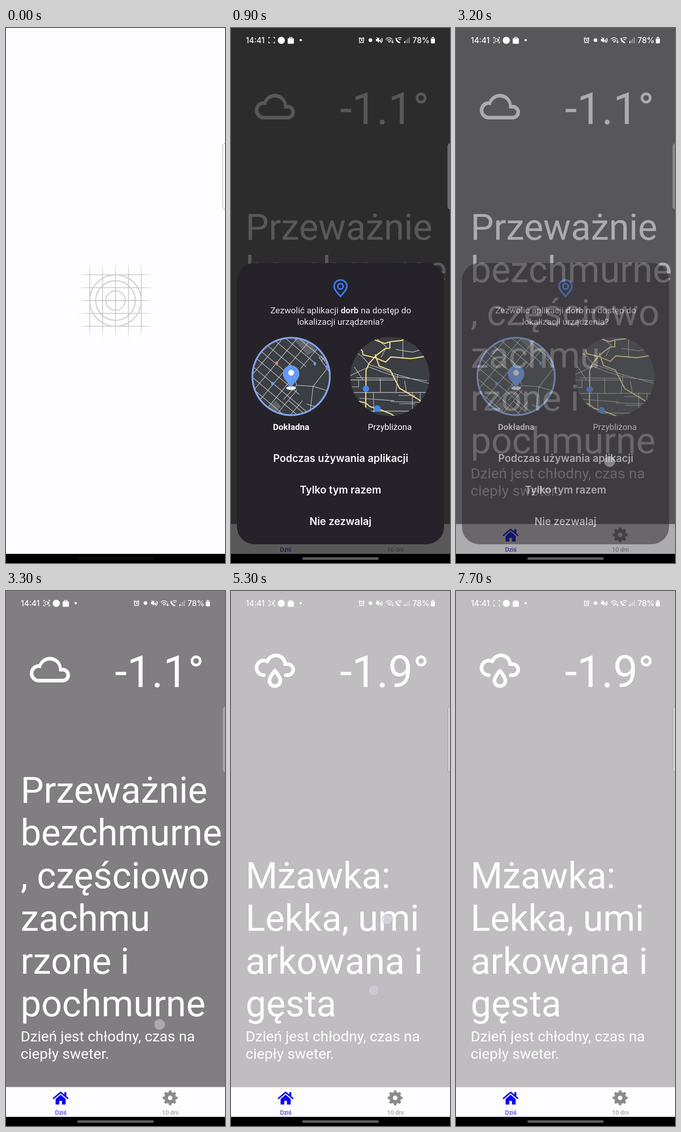
Recreate the animation shown at these times as an HTML page. Size 479 by 1170 pixels, loop 8 s.

```html
<!DOCTYPE html>
<html lang="pl">
<head>
<meta charset="utf-8">
<style>
html, body { margin: 0; width: 100%; height: 100%; overflow: hidden; background: #000; }
svg { display: block; width: 100%; height: 100%; }
text { font-family: Roboto, sans-serif; fill: #fdfcff; white-space: pre; }
.mid { text-anchor: middle; }
.big { font-size: 96px; }
.head { font-size: 80px; }
.note { font-size: 32px; }
.tab { font-size: 13.3px; }
.ask { font-size: 19.05px; fill: #e6e5e8; }
.label { font-size: 18.7px; }
.btn { font: 600 22.35px Inter, sans-serif; }
.clock { font: 500 17px Inter, sans-serif; }
.line { fill: none; stroke-linejoin: round; }
.road path, .road line { fill: none; stroke: #d4d5d7; stroke-width: 1.1; vector-effect: non-scaling-stroke; }
.road .main { stroke: #f8df90; stroke-width: 2.4; stroke-linejoin: round; }
</style>
</head>
<body>
<svg viewBox="0 0 479 1170" preserveAspectRatio="none">
  <defs>
    <linearGradient id="fadeX" gradientUnits="userSpaceOnUse" x1="155" x2="324" y1="0" y2="0">
      <stop stop-color="#b8b7ba" stop-opacity="0"/><stop offset=".17" stop-color="#b8b7ba"/>
      <stop offset=".83" stop-color="#b8b7ba"/><stop offset="1" stop-color="#b8b7ba" stop-opacity="0"/>
    </linearGradient>
    <linearGradient id="fadeY" href="#fadeX" x1="0" x2="0" y1="511.5" y2="680.5"/>
    <clipPath id="disc"><circle r="86.5"/></clipPath>
  </defs>

  <rect width="479" height="1170"/>
  <rect id="page" width="479" height="1150"/>
  <text id="loading" class="big" x="0" y="102">Loading...</text>
  <g id="cloudy"></g>
  <g id="rainy"></g>
  <g>
    <rect y="1085" width="479" height="65" fill="#fdfcff"/>
    <rect y="1084.5" width="479" height="1" fill="#d8d7da"/>
    <g id="tabs">
      <g fill="#0803f0">
        <path class="line" d="M104 1109.5 119.5 1096.5 135 1109.5" stroke="#0803f0" stroke-width="3.2" stroke-linecap="round"/>
        <path d="M127.5 1096h4.5v9h-4.5zM108.5 1111 119.5 1101.5 130.5 1111V1123H122.5V1115H116.5V1123H108.5Z"/>
      </g>
      <g class="line" stroke="#8a898c">
        <circle cx="359" cy="1108.5" r="9" stroke-width="8"/>
        <circle cx="359" cy="1108.5" r="13.6" stroke-width="5.4" pathLength="16" stroke-dasharray="1" stroke-dashoffset=".5"/>
      </g>
      <text class="tab mid" x="120" y="1145" style="fill:#1610c8">Dziś</text>
      <text class="tab mid" x="359.5" y="1145" style="fill:#8a898c">10 dni</text>
    </g>
  </g>

  <g id="splash">
    <rect width="479" height="1150" fill="#fdfcff"/>
    <g id="guides" class="line" stroke-width="1.3"></g>
    <g class="line" stroke="#cfced1" stroke-width="2.4">
      <circle cx="239.5" cy="596" r="56.3"/><circle cx="239.5" cy="596" r="43.3"/><circle cx="239.5" cy="596" r="21.2"/>
    </g>
  </g>

  <rect id="dim" width="479" height="1150"/>
  <rect x="474" y="252.5" width="20" height="144" rx="6" fill="#fff" fill-opacity=".3" stroke="#808082" stroke-opacity=".75"/>

  <g id="status" fill="#fdfcff" stroke="#fdfcff" stroke-width="0">
    <text class="clock" x="32.5" y="32.5">14:41</text>
    <path class="line" stroke-width="1.3" d="M82.5 23.500v-3h3M92.500 20.500h3v3M95.500 29.500v3h-3M85.500 32.500h-3v-3"/>
    <path id="rec" class="line" stroke-width="1.2" d="M85.500 23.500h5.500v6h-5.500zM91 26l2.500-2v5l-2.500-2"/>
    <circle cx="110" cy="27" r="7.8"/>
    <rect x="124" y="22.500" width="13.500" height="12" rx="1.500"/>
    <path class="line" stroke-width="1.4" d="M128 23v-2.500h5.500v2.500"/>
    <circle cx="152.500" cy="26.500" r="2.500"/>
    <g class="line" stroke-width="1.7">
      <circle cx="285.500" cy="27" r="4.700"/>
      <path d="M285.500 24v3.300h2.500M279.500 23.500l3-3M291.500 23.500l-3-3M282 31.500l-1.500 1.500M289 31.500l1.500 1.500"/>
      <path d="M318.500 20.500l11 12M327 24.500q1.500 2 0 4.500M329.500 22q3 4.500 0 8.500"/>
      <path d="M338.500 24.500q7-6.500 14 0M341 27.500q4.500-4 9 0M349.500 31v-5M353.500 26v6.500M351.500 30.500l2 2 2-2" stroke-width="1.400"/>
      <path d="M361 22q1 8.500 9 10" stroke-width="3"/>
      <path d="M364.500 22.500q4.500-3.500 9 0M366.500 25.500q2.500-2 5 0" stroke-width="1.400"/>
    </g>
    <circle cx="305" cy="26.500" r="4"/>
    <path d="M317 24h3l4-3.500v12l-4-3.500h-3zM344 30a1.700 1.700 0 1 0 3.400 0a1.700 1.700 0 1 0-3.400 0"/>
    <path d="M379 29h2v4h-2z"/>
    <path d="M382 26.500h2v6.500h-2zM385.500 23.500h2v9.500h-2zM389 20.500h2v12.500h-2z" opacity=".45"/>
    <text class="clock" x="397" y="32.500">78%</text>
    <rect x="437" y="21" width="9" height="12.500" rx="2" opacity=".55"/>
    <path d="M439.500 19.500h4v2h-4zM437 24h9v7.500q0 2-2 2h-5q-2 0-2-2z"/>
  </g>

  <g id="sheet">
    <rect x="13" y="514" width="453" height="615" rx="38" fill="#252329"/>
    <path class="line" stroke="#3a77f4" stroke-width="3.500" d="M239.500 587C235 581 225.500 573 225.500 565A14 14 0 0 1 253.500 565C253.500 573 244 581 239.500 587Z"/>
    <circle class="line" cx="239.500" cy="565" r="6" stroke="#3a77f4" stroke-width="3.300"/>
    <text class="ask mid" x="240" y="624">Zezwolić aplikacji <tspan font-weight="700">dorb</tspan> na dostęp do</text>
    <text class="ask mid" x="239.500" y="649">lokalizacji urządzenia?</text>

    <g transform="translate(131.500 762)">
      <g clip-path="url(#disc)">
        <rect x="-87" y="-87" width="174" height="174" fill="#3a3d41"/>
        <g id="near" class="road">
          <path d="M-10-95 12-85 46-48 30-38-8-82ZM-55 70-28 44-18 54-45 84Z" style="fill:#606367;stroke:none"/>
          <g id="streets" transform="rotate(40)"></g>
          <path d="M6-10 60-30 100 0V80L36 100 28 60 8 18Z" style="fill:#3a3d41;stroke:none"/>
          <path d="M2-12 10 16 40 18 66 26 100 36M10 16-14 42M40 18 34 68 26 100M66 26 48 74M28 50 78 66M-4 44 40 82M40 18 70-20M50-36 76 1H100M54-38 78-3H100"/>
        </g>
        <g id="pins"></g>
      </g>
      <g id="exact">
        <circle class="line" r="84.700" stroke="#86a4ee" stroke-width="3.800"/>
        <ellipse cy="25.500" rx="10.500" ry="4" fill="#fff" stroke="#a9c2f7"/>
        <path d="M0 26C-3 15-18 8-18-6A18 18 0 0 1 18-6C18 8 3 15 0 26Z" fill="#659af5"/>
        <circle cy="-8" r="6.200" fill="#fff"/>
      </g>
    </g>

    <g transform="translate(347.500 762)">
      <g clip-path="url(#disc)">
        <rect x="-87" y="-87" width="174" height="174" fill="#3a3d41"/>
        <g id="far" class="road">
          <path d="M0-120 50-90 110-100V-130H0Z" style="fill:#56595d;stroke:none"/>
          <path d="M-50 110q15-8 30-2 12-8 35-2v14h-65z" style="fill:#222326;stroke:none"/>
          <path d="M-100-70-64-46-47-27-17-17 13-5 85 15 125 18M-125 15-85-5-48-22-17-10 18 1 86 10M-77 3-7 4 15 4M-125 8H12M-72 8V24H-110M-125 37H125M30-120V-40M14-62 52-56 73-62 120-64M18-5 14 36M20 44H58M22 63H58M52 36V90M2 58 83 60M-38 36-36 110M-22 4V36M-82-22-62 8M-70 50 10 56M-90 60V120M70 36V110M50-90 90-78 110-30M-20-44-8-68-40-95M34 10 38 36M-60 80H70"/>
          <path class="main" d="M-120-95-82-80-63-58-62-50-34-43-10-33 2-45 48-41 74-45 125-54M-70-105-32-83-12-76 1-80 28-83 60-112M0-80V-65L-11-64-32-48-48-30-55-14-56 120M-34-51-25-24 1-14 22 27 66 53 125 104M-125 40-78 56-56 61-45 70-29 74 2 86 30 105 80 112M-125-36-96 6-88 34-112 60M75-110 105-75 108-45"/>
        </g>
        <g id="shields" fill="#4484ee"><circle r="7"/><circle r="7"/></g>
      </g>
      <g id="rough">
        <circle r="50" fill="#7e9fe4" fill-opacity=".55" stroke="#8eabe8" stroke-width="1.300"/>
        <circle class="line" r="85.500" stroke="#6d9bf2" stroke-width="2.400"/>
      </g>
    </g>

    <text class="label mid" x="131.500" y="879" font-weight="700">Dokładna</text>
    <text class="label mid" x="347.300" y="879">Przybliżona</text>
    <text class="btn mid" x="240" y="948.500">Podczas używania aplikacji</text>
    <text class="btn mid" x="239.500" y="1017.500">Tylko tym razem</text>
    <text class="btn mid" x="239.500" y="1086.500">Nie zezwalaj</text>
  </g>

  <rect id="pill" x="156" y="1157.500" width="167" height="5.500" rx="2.700" fill="#fff"/>
  <g id="taps" fill="#e0e0e4" fill-opacity=".6" stroke="#8fa6cf" stroke-opacity=".7"></g>
</svg>

<script>
const $ = id => document.getElementById(id);
const clamp = x => Math.min(1, Math.max(0, x));
const ramp = (t, from, to) => clamp((t - from) / (to - from));
const easeOut = p => 1 - (1 - p) ** 3;
const show = (id, alpha) => $(id).setAttribute('opacity', alpha);
const move = (el, value) => el.setAttribute('transform', value);

const CLOUD = 'M6,19A5,5 0 0,1 1,14A5,5 0 0,1 6,9C7,6.65 9.3,5 12,5C15.43,5 18.24,7.66 18.5,11.03L19,11A4,4 0 0,1 23,15A4,4 0 0,1 19,19H6M19,13H17V12A5,5 0 0,0 12,7C9.5,7 7.45,8.82 7.06,11.19C6.73,11.07 6.37,11 6,11A3,3 0 0,0 3,14A3,3 0 0,0 6,17H19A2,2 0 0,0 21,15A2,2 0 0,0 19,13Z';

// Weather screen: icon, temperature, bottom-aligned heading and note
function weather(id, icon, temp, lines) {
  const heading = lines.map((s, i) =>
    `<text class="head" x="32" y="${930 - 93.4 * (lines.length - 1 - i)}">${s}</text>`).join('');
  $(id).innerHTML = `<g transform="translate(48 124) scale(4)">${icon}</g>
    <text class="big" x="238" y="210">${temp}°</text>${heading}
    <text class="note" x="32" y="985">Dzień jest chłodny, czas na</text>
    <text class="note" x="32" y="1022.5">ciepły sweter.</text>`;
}
weather('cloudy', `<path fill="#fdfcff" d="${CLOUD}"/>`, '-1.1',
  ['Przeważnie', 'bezchmurne', ', częściowo', 'zachmu', 'rzone i', 'pochmurne']);
weather('rainy', `<g class="line" stroke="#fdfcff" stroke-width="2">
    <path stroke-linecap="round" d="M6 15A4 4 0 1 1 7.900 7.500A5 5 0 0 1 17.600 9H19A3 3 0 0 1 19 15H18"/>
    <path d="M12 12.600C10.600 14.300 9 16.500 9 18A3 3 0 0 0 15 18C15 16.500 13.400 14.300 12 12.600Z"/></g>`, '-1.9',
  ['Mżawka:', 'Lekka, umi', 'arkowana i', 'gęsta']);

for (let i = -2; i <= 2; i++) {
  const x = 239.5 + 28.2 * i, y = 596 + 28.2 * i;
  $('guides').innerHTML += `<path stroke="url(#fadeX)" d="M155 ${y}H324"/><path stroke="url(#fadeY)" d="M${x} 511.5V680.5"/>`;
}
for (let i = -7; i <= 7; i++) {
  $('streets').innerHTML += `<path d="M-130 ${i * 15.5}H130M${i * 20 + 4}-130V130"/>`;
}

const PINS = [[-26, -24, '#d98a5f'], [43, -23], [-34, 13], [65, -17]];
$('pins').innerHTML = PINS.map(p =>
  `<path fill="${p[2] || '#659af5'}" d="M0 5Q-3 2-3-1A3 3 0 0 1 3-1Q3 2 0 5Z"/>`).join('');
const SHIELDS = [[-40, 20.5], [-21, 53.5]];

// x, y, start, end, strength
const TAPS = [[336, 948, 3150, 3450, .75], [312, 873, 5120, 5450, .6], [342, 718, 5180, 5600, 1]];
$('taps').innerHTML = TAPS.map(([x, y]) => `<circle cx="${x}" cy="${y}" r="11.5"/>`).join('');

function scatter(id, spots, scale) {
  spots.forEach(([x, y], i) => move($(id).children[i], `translate(${x * scale} ${y * scale})`));
}

function draw(t) {
  const loaded = t >= 790, rain = t >= 5080;
  $('page').setAttribute('fill', rain ? '#bfbdc0' : loaded ? '#807e81' : '#f2f2f2');
  show('loading', +!loaded);
  show('tabs', +loaded);
  show('cloudy', +(loaded && !rain));
  show('rainy', +rain);
  show('splash', 1 - ramp(t, 80, 330));
  show('pill', .05 + .32 * ramp(t, 80, 330));

  const enter = ramp(t, 400, 826), leave = 1 - ramp(t, 3120, 3280);
  show('dim', .65 * enter * leave);
  show('sheet', leave);
  move($('sheet'), `translate(0 ${668 * (1 - easeOut(enter))})`);

  const zoom = easeOut(ramp(t, 600, 1300)), pick = ramp(t, 610, 850);
  const near = 1 + .25 * zoom, far = 1 + .38 * zoom;
  move($('near'), `scale(${near})`);
  move($('far'), `scale(${far / 1.38})`);
  scatter('pins', PINS, near);
  scatter('shields', SHIELDS, far);
  show('exact', pick);
  show('rough', 1 - pick);

  show('rec', +(t >= 210 && Math.floor((t - 210) / 498) % 2 === 0));
  TAPS.forEach(([, , from, to, alpha], i) => {
    const on = t >= from && t < to ? alpha * clamp((to - t) / 120) : 0;
    $('taps').children[i].setAttribute('opacity', on);
  });
}

const start = performance.now();
function tick() {
  draw((performance.now() - start) % 8000);
  requestAnimationFrame(tick);
}
tick();
</script>
</body>
</html>
```
